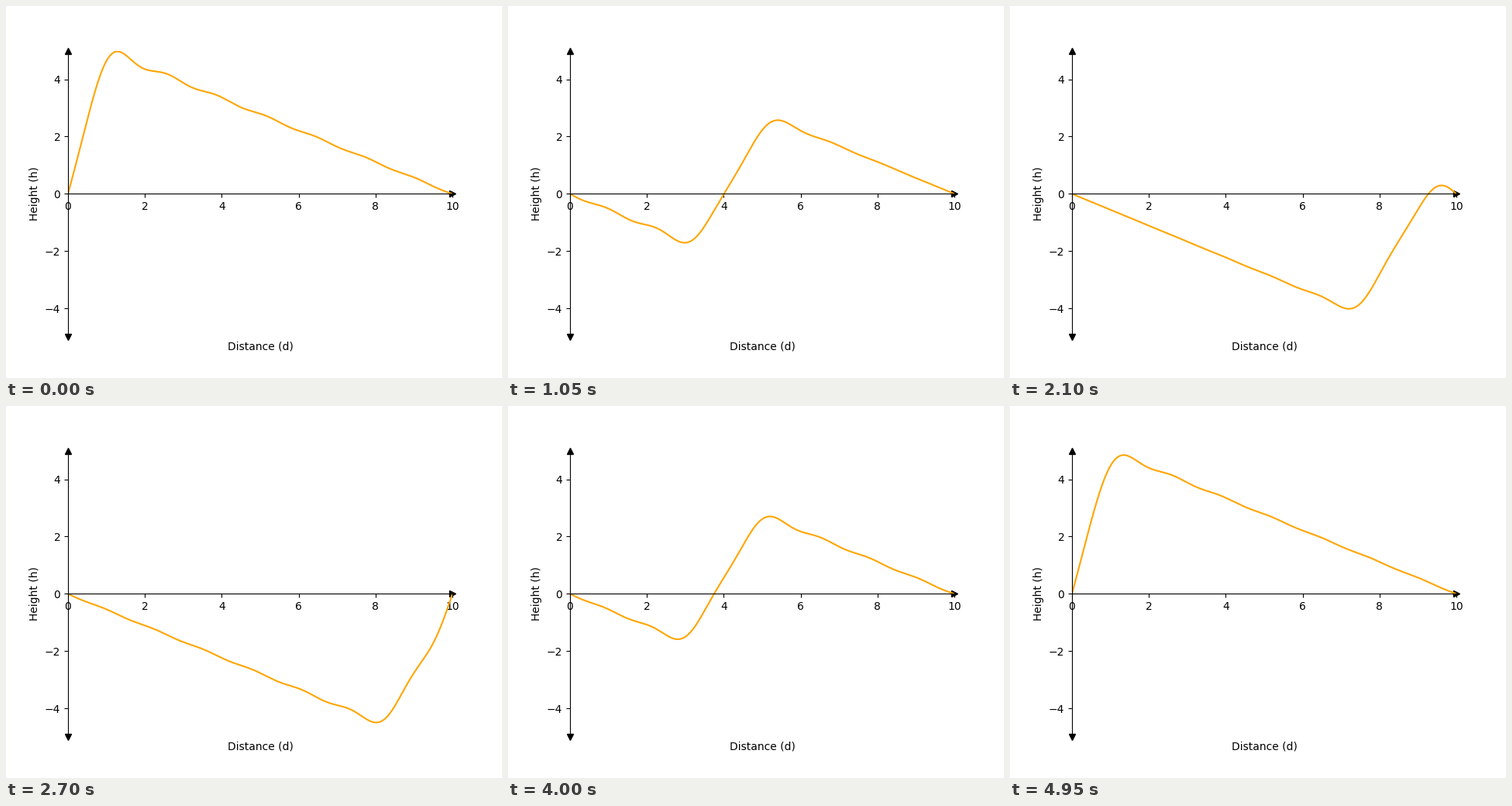
Recreate the animation shown at these times as a matplotlib script. Size 640 px wide and 480 px high, loop 5 s.

```python
import numpy as np
import matplotlib.pyplot as plt
from matplotlib.animation import FuncAnimation

LENGTH = 10      # string length
HEIGHT = 5       # initial height at the plucked point
PLUCK = 1        # plucked point
MODES = 15       # harmonics kept in the Fourier sum
FRAMES = 100
INTERVAL = 50    # ms

x = np.linspace(0, LENGTH, 500)
n = np.arange(1, MODES + 1)
k = n * np.pi / LENGTH
amps = (2 * HEIGHT * LENGTH**2 * np.sin(k * PLUCK)
        / (np.pi**2 * n**2 * PLUCK * (LENGTH - PLUCK)))
shapes = amps[:, None] * np.sin(np.outer(k, x))


def string(phase):
    """Shape of the plucked string; phase runs from 0 to 1 over one period."""
    return np.cos(2 * np.pi * n * phase) @ shapes


fig, ax = plt.subplots(figsize=(6.4, 4.8), dpi=100)
ax.set_xlim(0, LENGTH)
ax.set_ylim(-HEIGHT, HEIGHT)
ax.spines[["top", "right"]].set_visible(False)
ax.spines["left"].set_position(("data", 0))
ax.spines["bottom"].set_position(("data", 0))
ax.set_xlabel("Distance (d)")
ax.set_ylabel("Height (h)")
# Keep the label under the plot area rather than under the centred axis.
ax.xaxis.set_label_coords(0.5, -0.015)

# Arrowheads at the axis ends
for px, py, marker in [(LENGTH, 0, ">"), (0, HEIGHT, "^"), (0, -HEIGHT, "v")]:
    ax.plot(px, py, marker, color="black", clip_on=False)

line, = ax.plot(x, string(0), color="orange")


def update(frame):
    line.set_ydata(string(frame / FRAMES))
    return line,


anim = FuncAnimation(fig, update, frames=FRAMES, interval=INTERVAL, repeat=True)
plt.show()
```
